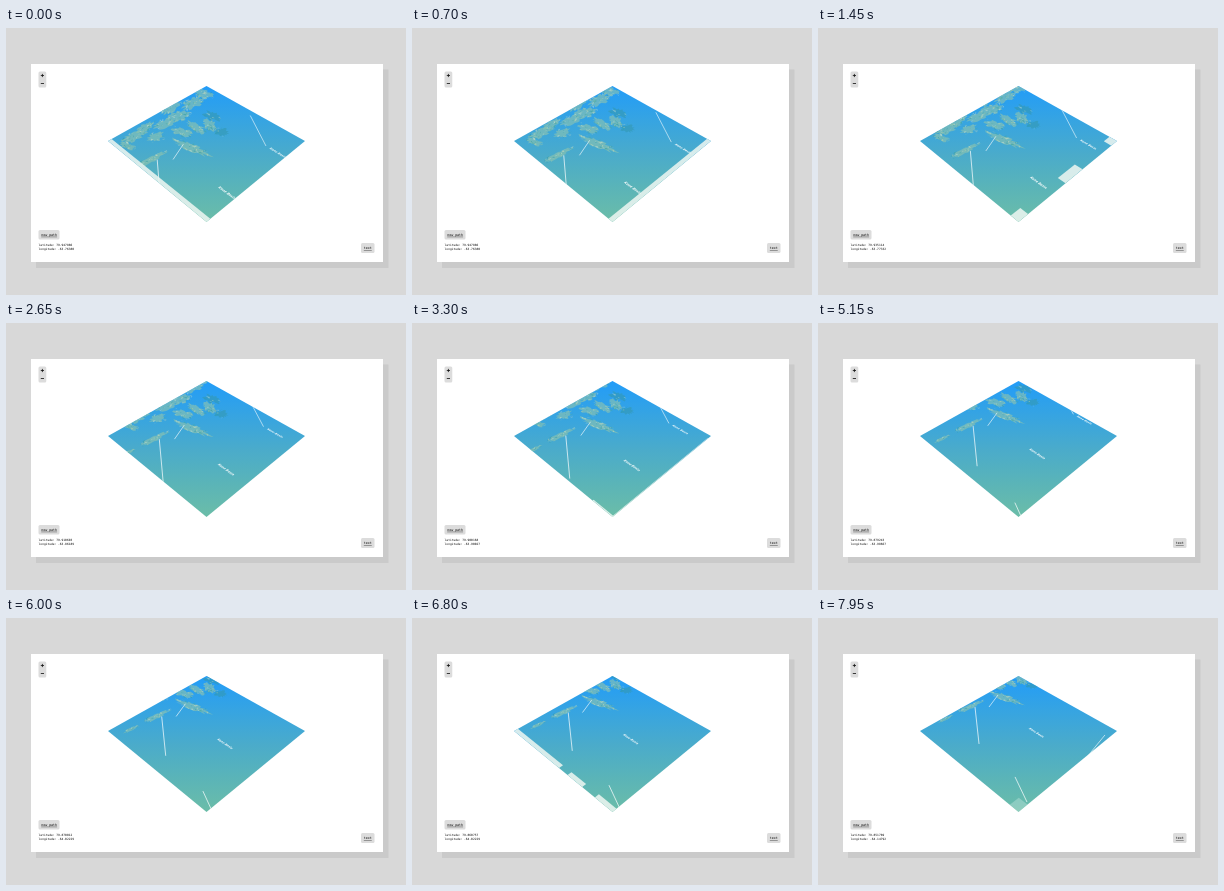
Recreate the animation shown at these times as an HTML page with a canvas. Size 400x267 px, loop 8000 ms.

```html
<!DOCTYPE html>
<html lang="en">
<head>
<meta charset="utf-8">
<title>Drifting map</title>
<style>
  html, body { margin: 0; width: 100%; height: 100%; overflow: hidden; background: #d8d8d8; }
  svg, canvas { position: absolute; left: 0; top: 0; width: 400px; height: 267px; }
  text { font: 2.95px "DejaVu Sans Mono", monospace; fill: #000; white-space: pre; }
  .button text { font-size: 3.3px; text-decoration: underline; }
  .button rect { fill: #dcdcdc; }
</style>
</head>
<body>
<svg viewBox="0 0 400 267">
  <rect x="30" y="41.5" width="352.5" height="198.5" fill="#cacaca"/>
  <rect x="25" y="36" width="352" height="198" fill="#fff"/>
  <g class="button">
    <rect x="32.5" y="43.5" width="7.8" height="16" rx="1.5"/>
    <rect x="32.5" y="202" width="21" height="9.5" rx="1.5"/>
    <rect x="355" y="215" width="13.5" height="10" rx="1.5"/>
    <text x="35.2" y="207.8">new path</text>
    <text x="357.8" y="221">text</text>
  </g>
  <path d="M34.8 47.5h3.2M36.4 45.9v3.2M34.8 55.5h3.2" stroke="#111" stroke-width=".8"/>
  <text id="lat" x="32.6" y="217.6"></text>
  <text id="lon" x="32.6" y="221.6"></text>
</svg>
<canvas id="map"></canvas>
<script>
const LOOP = 8, SPEED = 0.0833;
const canvas = document.getElementById('map');
const ctx = canvas.getContext('2d');
const ratio = window.devicePixelRatio || 1;
canvas.width = 400 * ratio;
canvas.height = 267 * ratio;

// Map plane: r runs left to right, s top to bottom; the tile is |r| + |s| <= 1.
const project = (r, s) => {
  const w = 1 - 0.191 * s;
  return [200.5 + 98.5 * r / w, (113 + 43.9 * s) / w];
};
const unproject = (x, y) => {
  const s = (y - 113) / (43.9 + 0.191 * y);
  return [(x - 200.5) * (1 - 0.191 * s) / 98.5, s];
};

let seed = 11;
const random = () => (seed = (seed * 16807) % 2147483647) / 2147483647;

// Screen place at time zero: x, y, half length, half width, tilt in degrees.
const islands = [
  [117, 147, 9, 2, -30], [146, 131, 16, 3, -25], [186, 120, 20, 3.6, 23],
  [176, 104, 11, 4, 15], [190, 99, 10, 4, 30], [204, 97, 8, 5, 30],
  [216, 104, 7, 4, 0], [206, 88, 9, 4, 20], [150, 109, 9, 4, -15],
  [128, 109, 14, 4, -25], [122, 118, 8, 3, 20], [158, 96, 11, 4, -20],
  [140, 99, 10, 4, -30], [174, 88, 12, 5, -15], [165, 80, 11, 4, -30],
  [187, 75, 12, 5, -25], [198, 66, 9, 4, 10]
].map(([x, y, length, width, tilt], index) => {
  const angle = tilt * Math.PI / 180;
  const place = (a, b) => unproject(
    x + a * Math.cos(angle) - b * Math.sin(angle),
    y + a * Math.sin(angle) + b * Math.cos(angle));
  const outline = Array.from({ length: 30 }, (_, i) => {
    const turn = i / 30 * 2 * Math.PI, size = 0.6 + 0.65 * random();
    return place(length * size * Math.cos(turn), width * size * Math.sin(turn));
  });
  const facets = Array.from({ length: Math.round(length * width * 0.6) }, () => {
    const turn = random() * 7, size = Math.sqrt(random()) * 1.05;
    const a = length * size * Math.cos(turn), b = width * size * Math.sin(turn);
    const near = () => place(a + random() * 5 - 2.5, b + random() * 3 - 1.5);
    return [near(), near(), near()];
  });
  return { outline, facets, teal: index === 6 || index === 7 };
});
const facetColors = ['#d5dfbd77', '#2f98a488', '#b6d0aa88', '#4aa99a88', '#edf1d466'];

// r and s of both ends, then width
const lines = [
  [-0.475, 0.268, -0.386, 0.853, 0.8],
  [-0.2325, 0.048, -0.322, 0.268, 0.7],
  [0.48, -0.42, 0.595, 0.075, 0.65],
  [-0.031, 1.281, 0.0715, 1.561, 0.8],
  [0.868, 0.722, 0.64, 1.04, 0.7]
];
const labels = [[0.18, 0.69], [0.7, 0.177]];

// Missing tiles along the lower edges: side, from, to, start of growth, shown from, shown until
const gaps = [
  ['left', -1, 1, -0.75, 0, 0.5],
  ['right', -1, 1, -0.1, 0.3, 1],
  ['right', -1, -0.86, -0.1, 1, 1.8],
  ['right', -0.2, 0.15, -0.1, 1, 1.8],
  ['right', 0.84, 1, -0.1, 1, 1.8],
  ['right', -0.93, 1, 3.2, 3.2, 4.3],
  ['left', 0.66, 1, 3.1, 3.2, 4.3],
  ['left', -1, 1, 6, 6, 6.5],
  ['left', -1, 0.02, 6, 6.5, 7.1],
  ['left', 0.19, 0.47, 6, 6.5, 7.1],
  ['left', 0.7, 1, 6, 6.5, 7.1],
  ['right', 0.85, 1, 6.2, 7, 8]
];

// time, latitude, longitude
const readings = [
  [0, '79.947886', '-63.76380'], [0.9, '79.935114', '-63.77332'],
  [1.75, '79.922840', '-63.81764'], [2.6, '79.910603', '-63.86189'],
  [3.2, '79.900168', '-63.90027'], [3.8, '79.889729', '-63.93866'],
  [4.6, '79.879243', '-63.98667'], [5.4, '79.870012', '-64.02229'],
  [6.2, '79.860757', '-64.02229'], [7.2, '79.851789', '-64.14792']
];

function trace(points) {
  ctx.beginPath();
  points.forEach(([r, s]) => ctx.lineTo(...project(r, s)));
}
function fill(points, color) {
  trace(points);
  ctx.closePath();
  ctx.fillStyle = color;
  ctx.fill();
}

function drawLabel(r, s) {
  const [x, y] = project(r, s), step = 0.01, size = 0.0053 / (2 * step);
  const [rightX, rightY] = project(r + step, s + step);
  const [downX, downY] = project(r - step, s + step);
  ctx.save();
  ctx.transform((rightX - x) * size, (rightY - y) * size,
    (downX - x) * size, (downY - y) * size, x, y);
  ctx.font = 'italic bold 10px "Open Sans", sans-serif';
  ctx.textAlign = 'center';
  ctx.textBaseline = 'middle';
  ctx.fillStyle = '#fff';
  ctx.fillText('Kane Basin', 0, 0);
  ctx.restore();
}

function drawGap([side, from, to, start, shown, until], t) {
  if (t < shown || t >= until) return;
  const inner = 1 - (t - start) * SPEED;
  const corners = [[inner, from], [1, from], [1, to], [inner, to]];
  const sign = side === 'left' ? -1 : 1;
  ctx.globalAlpha = Math.min(1, (until - t) / 0.15);
  fill(corners.map(([across, along]) =>
    [sign * (across - along) / 2, (across + along) / 2]), '#edf6f2dd');
  ctx.globalAlpha = 1;
}

function drawMap(t) {
  const shift = t * SPEED;
  const move = ([r, s]) => [r, s - shift];
  ctx.setTransform(ratio, 0, 0, ratio, 0, 0);
  ctx.clearRect(0, 0, 400, 267);
  ctx.save();

  const sea = ctx.createLinearGradient(0, 58, 0, 194);
  ['#229cf8', '#36a4e2', '#4aabcb', '#5ab4b8', '#6bbda8'].forEach((color, i) =>
    sea.addColorStop(i / 4, color));
  fill([[0, -1], [1, 0], [0, 1], [-1, 0]], sea);
  ctx.clip();

  for (const { outline, facets, teal } of islands) {
    fill(outline.map(move), teal ? '#3399b5a0' : '#8fc5ad99');
    facets.forEach((facet, i) => {
      if (!teal || i % 3 === 1) fill(facet.map(move), facetColors[i % 5]);
    });
  }

  ctx.strokeStyle = '#ffffffe0';
  for (const [r1, s1, r2, s2, width] of lines) {
    trace([[r1, s1], [r2, s2]].map(move));
    ctx.lineWidth = width;
    ctx.stroke();
  }
  labels.forEach(([r, s]) => drawLabel(r, s - shift));
  gaps.forEach(gap => drawGap(gap, t));
  ctx.restore();
}

function frame(now) {
  const t = (now / 1000) % LOOP;
  drawMap(t);
  const [, latitude, longitude] = readings.filter(([time]) => time <= t).pop();
  document.getElementById('lat').textContent = 'latitude: ' + latitude;
  document.getElementById('lon').textContent = 'longitude: ' + longitude;
  requestAnimationFrame(frame);
}
frame(0);
</script>
</body>
</html>
```
